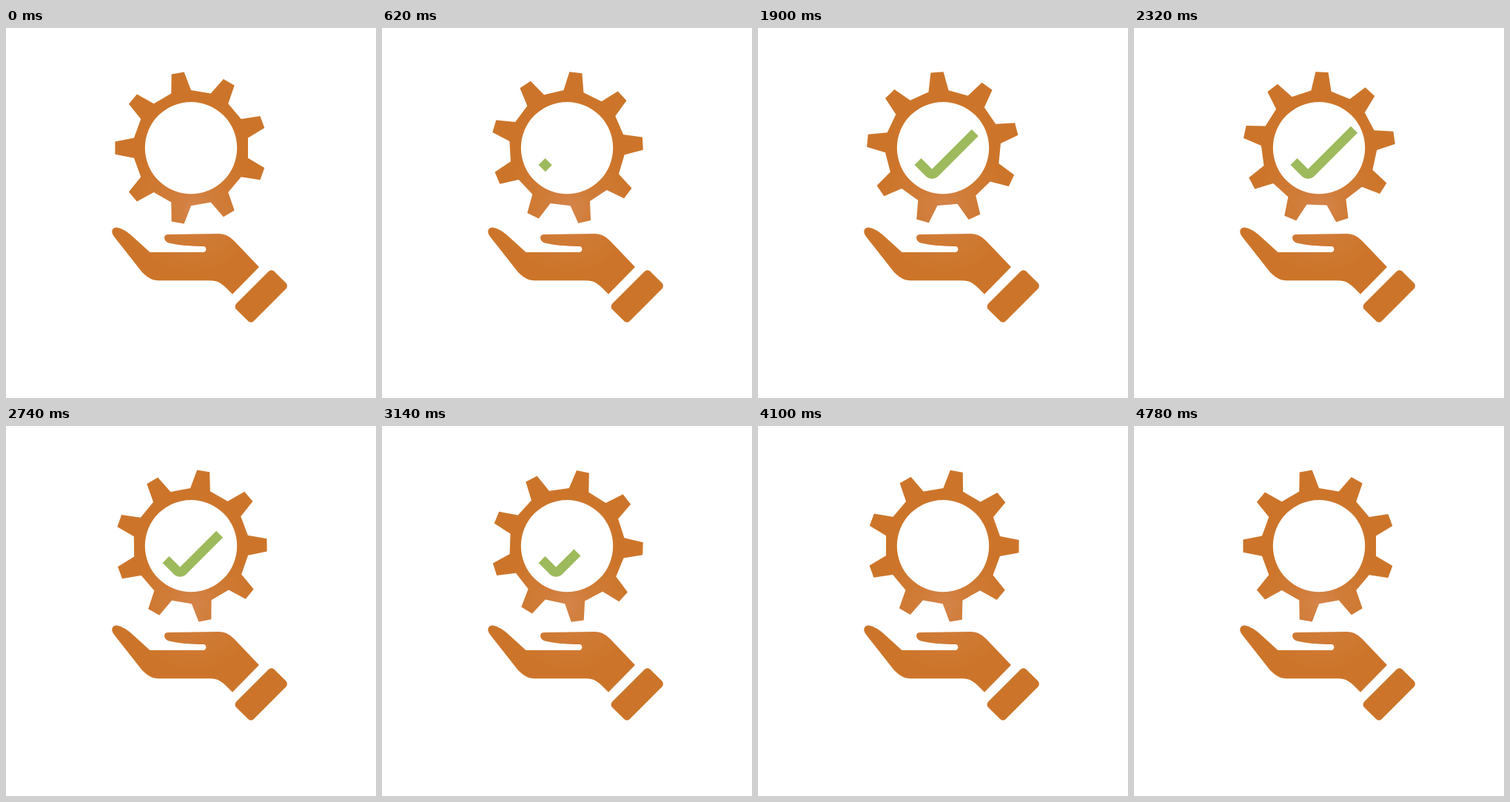
Write an HTML page with a canvas that moves like this. It is 500 px wide and 500 px high and loops after 4.8 s.

```html
<!DOCTYPE html>
<html lang="en">
<head>
<meta charset="utf-8">
<title>Gear and hand</title>
<style>
html, body { margin: 0; width: 100%; height: 100%; overflow: hidden; background: #fff; }
canvas { display: block; width: 500px; height: 500px; }
</style>
</head>
<body>
<canvas id="stage" width="500" height="500"></canvas>
<script>
const ctx = document.getElementById('stage').getContext('2d');
const LOOP = 4800;
const TURN = 4780;
const GREEN = '#9dba5c';
const GEAR = { x: 250, y: 162.1, hole: 62.2, base: 78.2, tip: 102.9, teeth: 9 };
const CHECK = { min: 13, grow: 100, span: 1535, inAt: 600, outAt: 2396 };

const orange = ctx.createRadialGradient(252, 243, 0, 252, 243, 88);
orange.addColorStop(0, '#d5844a');
orange.addColorStop(0.4, '#d07c38');
orange.addColorStop(1, '#cc752a');

const hand = new Path2D(`M143.8 278 C142 273 145 269 150 269.5 C157 271 163 275 168 279
  L194.5 303 H267 C271.5 302 271.5 295.5 267 295
  C248 295 233 293.5 220 290.5 C214 288.5 213 283 215 280.5 Q216 279 219 279
  L287 278 C298 278 304 283 311 290.5 L342 323 L306 359.8
  L298 351.8 C291 345 286 341.3 276 341.3 H207 C197 341.3 190 336.5 183.5 329.5
  L146.5 282.5 Q144.6 280 143.8 278 Z`);

const cuff = roundedPoly([[358.7, 325], [382.2, 348.5], [331, 400], [307.3, 376.4]], 5.5);

const check = new Path2D(`M216 180.5 L231.3 195.8 A5.5 5.5 0 0 0 239.1 195.8 L297.6 137.3`);

function roundedPoly(pts, r) {
  const p = new Path2D();
  const n = pts.length;
  p.moveTo((pts[0][0] + pts[n - 1][0]) / 2, (pts[0][1] + pts[n - 1][1]) / 2);
  pts.forEach((a, i) => {
    const b = pts[(i + 1) % n];
    p.arcTo(a[0], a[1], b[0], b[1], r);
  });
  p.closePath();
  return p;
}

function ease(t, start, span) {
  const u = Math.min(1, Math.max(0, (t - start) / span));
  return u * u * (3 - 2 * u);
}

// Points are rotated by hand so the highlight stays still.
function drawGear(turn) {
  const { x, y, hole, base, tip, teeth } = GEAR;
  const step = 360 / teeth;
  const profile = [[-10, base], [-4.8, tip], [4.8, tip], [10, base]];
  ctx.beginPath();
  for (let i = 0; i < teeth; i++) {
    for (const [offset, r] of profile) {
      const a = (turn + i * step + offset) * Math.PI / 180;
      ctx.lineTo(x + r * Math.cos(a), y + r * Math.sin(a));
    }
  }
  ctx.closePath();
  ctx.moveTo(x + hole, y);
  ctx.arc(x, y, hole, 0, 2 * Math.PI);
  ctx.fill('evenodd');
}

function drawCheck(t) {
  const { min, grow, span, inAt, outAt } = CHECK;
  if (t < inAt || t > outAt + span) return;
  const length = min + grow * (ease(t, inAt, span) - ease(t, outAt, span));
  ctx.setLineDash([length, 500]);
  ctx.lineWidth = 12.7;
  ctx.strokeStyle = GREEN;
  ctx.stroke(check);
}

function draw(t) {
  ctx.fillStyle = '#fff';
  ctx.fillRect(0, 0, 500, 500);
  ctx.fillStyle = orange;
  ctx.fill(hand);
  ctx.fill(cuff);
  drawGear(20 + 360 * ease(t, 0, TURN));
  drawCheck(t);
}

const began = performance.now();
function tick() {
  draw((performance.now() - began) % LOOP);
  requestAnimationFrame(tick);
}
tick();
</script>
</body>
</html>
```
